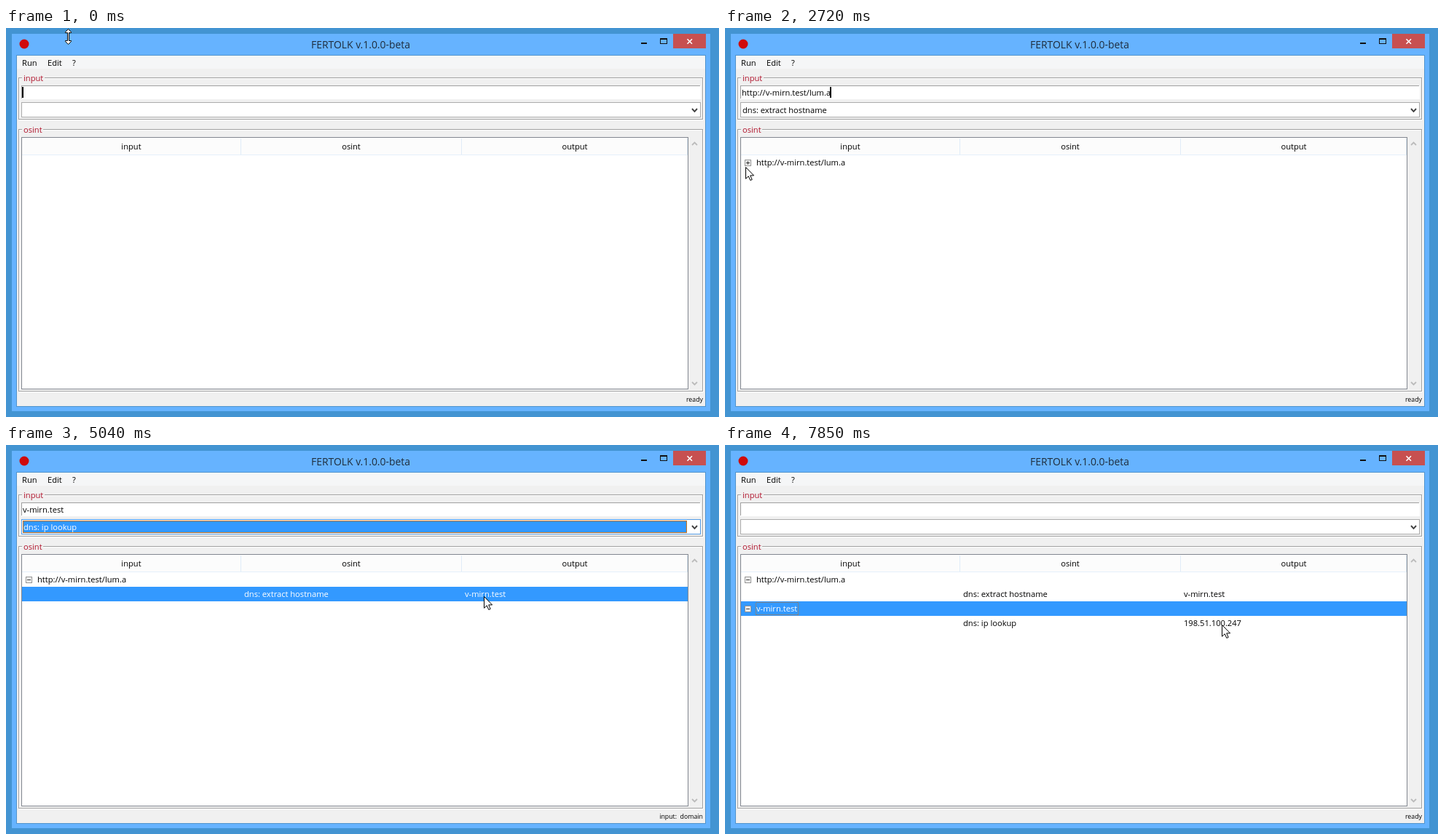
Write an HTML page that moves like this. It is 979 by 535 pixels and loops after 8000 ms.

```html
<!DOCTYPE html>
<html lang="en">
<head>
<meta charset="utf-8">
<title>Lookup tool</title>
<style>
  html, body { margin: 0; width: 100%; height: 100%; overflow: hidden; background: #4394d2; }
  svg { display: block; width: 979px; height: 535px; }
  text { font: 11.15px "Open Sans", "Noto Sans", sans-serif; white-space: pre; }
  .small { font-size: 8.8px; }
  .title { font-size: 13.9px; }
  rect { shape-rendering: crispEdges; }
</style>
</head>
<body>
<svg viewBox="0 0 979 535">
  <g id="base"></g>
  <g id="live"></g>
  <g id="pointer"></g>
</svg>
<script>
const LOOP = 8000;
const TICK = 155.6, TICK_OFFSET = 55;   // the screen is refreshed once per tick
const BLUE = '#3399ff', ORANGE = '#c8701c', GRAY = '#f0f0f0';
const HOST = 'v-mirn.test';

// The ticks at which each lookup is pasted, recognised, run and opened in the tree.
const lookups = [
  { text: `http://${HOST}/lum.a`, kind: 'url', task: 'dns: extract hostname', output: HOST,
    paste: 4, detect: 7, run: 9, open: 20 },
  { text: HOST, kind: 'domain', task: 'dns: ip lookup', output: '198.51.100.247',
    paste: 32, detect: 32, run: 35, open: 45 }
];

// Places where the pointer rests or turns.
const stops = [
  { at: 9, x: 86, y: 1 }, { at: 13, x: 66, y: 200 }, { at: 17, x: 28, y: 191 },
  { at: 20, x: 28, y: 191 }, { at: 25, x: 19, y: 224 }, { at: 31, x: 656, y: 208 },
  { at: 33, x: 656, y: 208 }, { at: 36, x: 681, y: 150 }, { at: 44, x: 28, y: 223 },
  { at: 45, x: 16, y: 233 }, { at: 50, x: 682, y: 247 }
];

const ARROW = 'M.5 .5V16.3L4.2 12.8L6.8 18.5L9.2 17.5L6.7 11.9H11.6Z';
const RESIZE = 'M4.5 .5L8.5 4.5V5.5H5.5V16.5H8.5V17.5L4.5 21.5L.5 17.5V16.5H3.5V5.5H.5V4.5Z';

const $ = id => document.getElementById(id);
const box = (x, y, w, h, fill) =>
  `<rect x="${x}" y="${y}" width="${w}" height="${h}" fill="${fill}"/>`;
const frame = (x, y, w, h, stroke, fill = 'none', dash = 'none') =>
  `<rect x="${x + .5}" y="${y + .5}" width="${w - 1}" height="${h - 1}" fill="${fill}" stroke="${stroke}" stroke-dasharray="${dash}"/>`;
const label = (x, y, s, fill = '#000', anchor = 'start', cls = '') =>
  `<text x="${x}" y="${y}" fill="${fill}" text-anchor="${anchor}" class="${cls}">${s}</text>`;
const line = (d, stroke, weight) =>
  `<path d="${d}" fill="none" stroke="${stroke}" stroke-width="${weight}"/>`;
const statusText = s => label(957, 514, s, '#000', 'end', 'small');

const pen = document.createElement('canvas').getContext('2d');
pen.font = '11.15px "Open Sans", "Noto Sans", sans-serif';
const widthOf = s => Math.round(pen.measureText(s).width);

function group(y, h, name, labelWidth) {
  return frame(18, y + 1, 940, h, '#fff') + frame(17, y, 940, h, '#a0a0a0') +
    box(22, y - 3, labelWidth, 9, GRAY) + label(24, y + 5, name, '#b0142c');
}

function drawBase() {
  const titleBar = box(8, 8, 959, 519, '#66b3ff') + frame(14, 37, 947, 484, '#5294cc') +
    '<circle cx="25" cy="22" r="6.5" fill="#d00a0a"/>' +
    label(487, 28, 'FERTOLK v.1.0.0-beta', '#1f2d3b', 'middle', 'title') +
    box(872, 20, 8, 2, '#111') +
    frame(898, 14, 10, 8, '#111') + box(898, 14, 10, 2, '#111') +
    box(916, 8, 45, 20, '#c75050') +
    line('M935.5 15.2L942 21.7M942 15.2L935.5 21.7', '#fff', 1.6);

  const menu = box(15, 38, 945, 482, GRAY) + box(15, 38, 945, 18, '#f5f6f7') +
    label(22, 52, 'Run') + label(57, 52, 'Edit') + label(91, 52, '?');

  const entry = box(21, 79, 933, 19, '#fff') + box(21, 79, 932, 1, '#a0a0a0') +
    box(21, 79, 1, 18, '#a0a0a0');

  const tree = frame(21, 150, 916, 347, '#828790', '#fff') +
    box(22, 151, 914, 24, '#fcfcfc') + box(22, 174, 914, 1, '#e5f0fa') +
    [322, 625, 935].map(x => box(x, 152, 1, 22, '#e0ecf8')).join('') +
    label(172, 167, 'input', '#000', 'middle') +
    label(474, 167, 'osint', '#000', 'middle') +
    label(781, 167, 'output', '#000', 'middle') +
    line('M942 161L945.5 157.5L949 161M942 487L945.5 490.5L949 487', '#bcbcbc', 1.8);

  $('base').innerHTML = titleBar + menu + group(68, 58, 'input', 31) + entry +
    group(139, 361, 'osint', 29) + tree;
}

function drawCombo(text, focused) {
  return frame(21, 102, 933, 21, focused ? '#569de5' : '#acacac', '#fff') +
    (focused ? frame(23, 104, 912, 17, ORANGE, BLUE) : '') +
    label(24, 117, text, focused ? '#fff' : '#000') +
    line('M942 111L945.5 114.8L949 111', '#404040', 1.9);
}

const rowBack = (y, selected) => selected ? box(22, y, 914, 20, BLUE) : '';
const ink = selected => selected ? '#fff' : '#000';

function drawHead(y, text, open, selected) {
  return rowBack(y, selected) +
    frame(27, y + 6, 9, 9, '#919191', '#fff') + box(29, y + 10, 5, 1, '#333') +
    (open ? '' : box(31, y + 8, 1, 5, '#333')) +
    label(43, y + 14, text, ink(selected)) +
    (selected ? frame(42, y + 1, widthOf(text) + 3, 18, ORANGE, 'none', '1 1') : '');
}

function drawResult(y, { task, output }, selected) {
  return rowBack(y, selected) + label(327, y + 14, task, ink(selected)) +
    label(630, y + 14, output, ink(selected));
}

function drawTree(n, current) {
  let y = 175, out = '';
  for (const item of lookups.filter(l => n >= l.run)) {
    const open = n >= item.open;
    out += drawHead(y, item.text, open, open && item === current);
    y += 20;
    if (open) {
      out += drawResult(y, item, item !== current && n < current.open);
      y += 20;
    }
  }
  return out;
}

// For two ticks after a run the new status covers only part of the old one.
function drawStatus(n, current) {
  if (!current || n < current.detect) return statusText('ready');
  const old = statusText('input:  ' + current.kind);
  if (n < current.run) return old;
  const rest = n < current.run + 2 ? old + box(932, 506, 27, 12, GRAY) : '';
  return rest + statusText('ready');
}

function caretShown(n, current) {
  if (current && (n >= current.open || (n >= current.detect && n < current.run))) return false;
  const start = current && n >= current.run ? current.run : -3;
  return (n - start) % 6 < 4;
}

function drawLive(n) {
  const current = lookups.filter(l => n >= l.paste).pop();
  const filled = current && n < current.open;
  const detected = filled && n >= current.detect;
  const text = filled ? current.text : '';
  const caret = caretShown(n, current) ? box(22 + widthOf(text), 81, 2, 15, '#000') : '';
  $('live').innerHTML = label(23, 93, text) + caret +
    drawCombo(detected ? current.task : '', detected && n < current.run) +
    drawTree(n, current) + drawStatus(n, current);
}

function pointerAt(n) {
  const next = stops.findIndex(s => s.at > n);
  if (next === 0) return stops[0];
  if (next < 0) return stops[stops.length - 1];
  const a = stops[next - 1], b = stops[next];
  const p = (n - a.at) / (b.at - a.at), ease = p * p * (3 - 2 * p);
  const mix = key => Math.round(a[key] + (b[key] - a[key]) * ease);
  return { x: mix('x'), y: mix('y') };
}

function drawPointer(n) {
  const resizing = n < 1;
  const { x, y } = resizing ? { x: 81, y: 1 } : pointerAt(n);
  $('pointer').innerHTML =
    `<path transform="translate(${x} ${y})" d="${resizing ? RESIZE : ARROW}" fill="#fff" stroke="#000"/>`;
}

const start = performance.now();
let shown = -1;

function update() {
  const t = (performance.now() - start) % LOOP;
  const n = Math.max(0, Math.floor((t - TICK_OFFSET) / TICK));
  if (n !== shown) {
    shown = n;
    drawLive(n);
    drawPointer(n);
  }
  requestAnimationFrame(update);
}

drawBase();
update();
</script>
</body>
</html>
```
